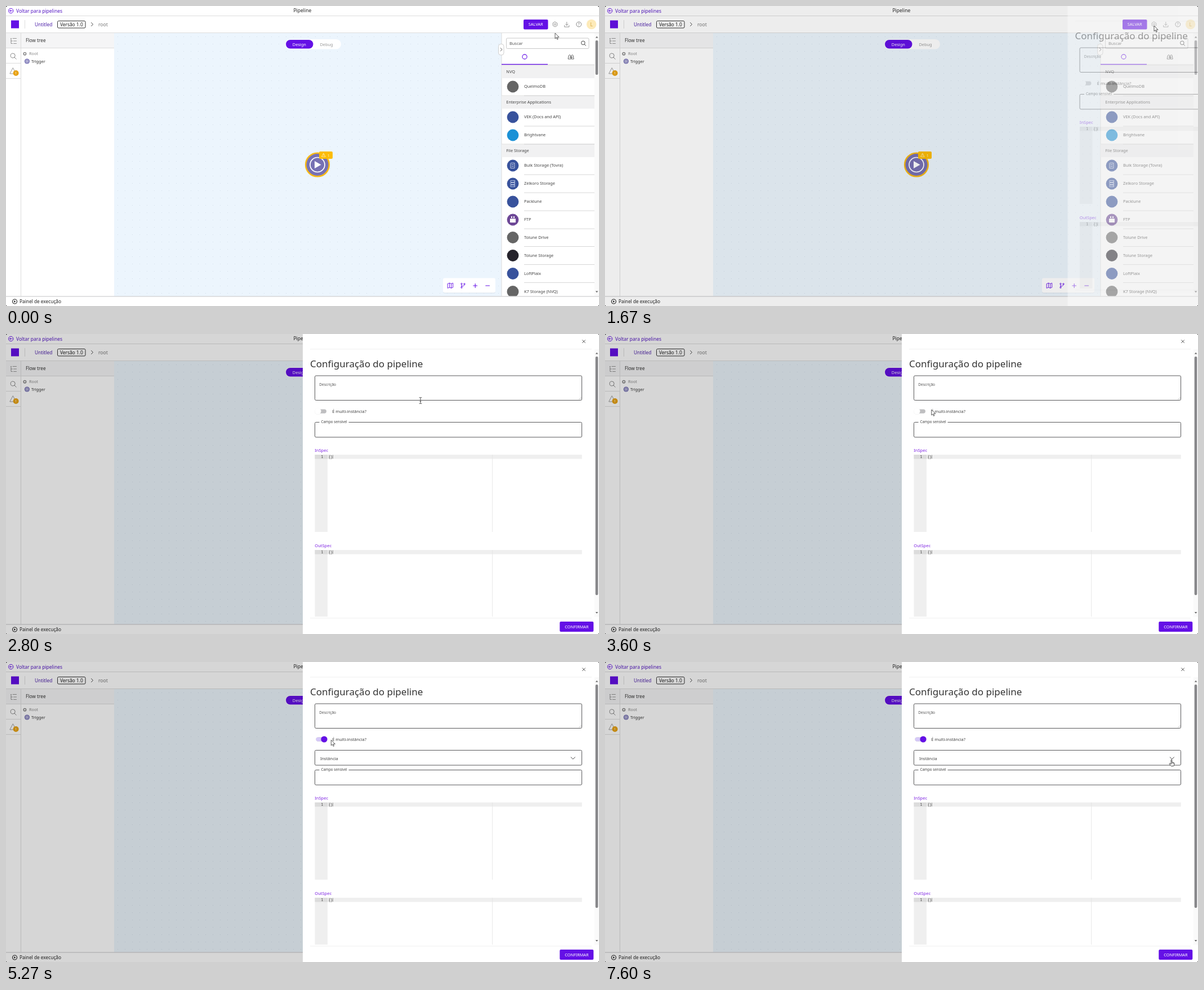
Animation, 1053 px wide and 532 px high, one loop 8000 ms. Source, as an HTML page:

```html
<!DOCTYPE html>
<html lang="pt">
<head>
<meta charset="utf-8">
<title>Pipeline</title>
<style>
html, body { margin: 0; width: 100%; height: 100%; overflow: hidden; background: #000; }
svg { display: block; width: 1053px; height: 532px; font-family: "Noto Sans", sans-serif; }
.mono { font-family: "Noto Sans Mono", monospace; }
</style>
</head>
<body>
<svg id="stage" viewBox="0 0 1053 532" xmlns="http://www.w3.org/2000/svg"></svg>
<script>
const PURPLE = '#6410e6', INK = '#333', LINE = '#dcdcdc', AMBER = '#f7b916';

const rect = (x, y, w, h, fill, more = '') =>
  `<rect x="${x}" y="${y}" width="${w}" height="${h}" fill="${fill}" ${more}/>`;
const disc = (x, y, r, fill, more = '') =>
  `<circle cx="${x}" cy="${y}" r="${r}" fill="${fill}" ${more}/>`;
const ring = (x, y, r, color, w = 1) => disc(x, y, r, 'none', `stroke="${color}" stroke-width="${w}"`);
const path = (d, color, w = 1, fill = 'none') =>
  `<path d="${d}" fill="${fill}" stroke="${color}" stroke-width="${w}" stroke-linecap="round" stroke-linejoin="round"/>`;
const shape = (d, fill) => `<path d="${d}" fill="${fill}"/>`;
const text = (x, y, s, size, fill = INK, more = '') =>
  `<text x="${x}" y="${y}" font-size="${size}" fill="${fill}" ${more}>${s}</text>`;
const mid = 'text-anchor="middle"';

function topBars() {
  return rect(0, 0, 1053, 532, '#fff') +
    rect(0, 17, 1053, 1, LINE) + rect(0, 47, 1053, 1, LINE) +
    ring(8.7, 8.5, 4.2, PURPLE) + path('M11 8.5H6.6M8.3 6.7L6.5 8.5l1.8 1.8', PURPLE, .9) +
    text(18, 11.5, 'Voltar para pipelines', 8.5, '#5416c4') +
    text(526.3, 11.4, 'Pipeline', 8.5, '#222', mid + ' font-weight="500"') +
    rect(9, 25.5, 14, 14, PURPLE) +
    rect(33, 25, 1, 15, LINE) +
    text(51, 35.5, 'Untitled', 8.3, '#4a1ca8') +
    rect(91.5, 26.5, 49.5, 12.5, '#fff', 'rx="2" stroke="#333"') +
    text(116.3, 35.8, 'Versão 1.0', 8.4, '#222', mid) +
    path('M151.5 29.5l3 3-3 3', '#444') +
    text(164, 35.5, 'root', 8.5, '#777') +
    rect(919, 24, 43.5, 17.5, PURPLE, 'rx="2"') +
    text(940.7, 35.4, 'SALVAR', 7.4, '#fff', mid + ' font-weight="500"') +
    `<g id="hover">${disc(975, 32.5, 8.8, '#e3e3e6')}${ring(975, 32.5, 8.8, '#cfcfd4', .8)}</g>` +
    path('M975 28.2l3.8 2.2v4.3l-3.8 2.2-3.8-2.2v-4.3z', '#888', .9) + ring(975, 32.5, 1.5, '#888', .9) +
    path('M995.8 28.5v5.5M993.5 32l2.3 2.3 2.3-2.3M991.7 34.5v2.6h8.2v-2.6', '#888', .9) +
    ring(1017.2, 32.5, 4.4, '#777', .9) + text(1017.2, 34.9, '?', 6.5, '#666', mid) +
    disc(1039.6, 32.5, 8.7, '#fdeab8') + text(1039.6, 35.6, 'L', 8.4, '#d3a43b', mid);
}

function leftSide() {
  return rect(0, 48, 26, 26, '#f3f3f4') +
    rect(26, 48, 1, 467, LINE) + [74, 101, 128].map(y => rect(0, y, 26, 1, LINE)).join('') +
    path('M8.5 57.5h1M12 57.5h6.5M9 58v8.5h2.5M9 62h2.5M13.5 62h5M13.5 66.5h5', '#888', .9) +
    ring(12.2, 88, 4, '#888') + path('M15.2 91.2l3 3', '#888') +
    path('M12.5 110l5.3 10H7.2z', '#999') +
    disc(17.6, 119, 5, '#e8a317') + text(17.6, 121.1, '1', 5.5, '#fff', mid) +
    rect(27, 48, 165, 26, '#f5f5f6') + rect(27, 74, 165, 1, LINE) +
    text(35, 64, 'Flow tree', 8.3) +
    ring(33.4, 84.7, 2.2, '#888', 1.6) + text(41, 87.3, 'Root', 7.3, '#888') +
    disc(37.4, 98, 4.6, '#7772b4') + ring(37.4, 98, 2.7, '#fff', .6) + shape('M36.6 96.5l2.4 1.5-2.4 1.5z', '#fff') +
    text(45, 100.5, 'Trigger', 7.3);
}

function canvasArea() {
  return rect(192, 48, 688, 467, '#ecf5fd') + rect(192, 48, 688, 467, 'url(#dots)') +
    rect(496, 59, 99, 17.5, '#fff', 'rx="8.7"') + rect(497, 60, 48.5, 15.5, PURPLE, 'rx="7.7"') +
    text(520.8, 70.6, 'Design', 7.4, '#fff', mid + ' font-weight="500"') +
    text(569, 70.6, 'Debug', 7.4, '#999', mid) +
    disc(553, 281.5, 20.8, '#7771b4', `stroke="${AMBER}" stroke-width="2.6"`) +
    ring(553, 281.5, 13, '#fff', 1.7) + shape('M548 275v13l11.5-6.5z', '#fff') +
    rect(556, 258, 24, 13, '#fcbc05', 'rx="2"') +
    path('M564 261.5l3.2 5.8h-6.4zM564 263.5v1.8', '#fff3cf', .7) + text(572.8, 267.5, '1', 7, '#fff3cf', mid) +
    rect(776, 483.5, 93, 26, '#d8e2ec', 'rx="3"') + rect(776, 482.5, 93, 26, '#fff', 'rx="3"') +
    path('M784.5 492.5l3-1.2 3.2 1.2 3-1.2v7.7l-3 1.2-3.2-1.2-3 1.2zM787.5 491.5v7.3M790.7 492.5v7.5', PURPLE, .9) +
    ring(809, 492.7, 1.2, PURPLE, .9) + ring(814, 493, 1.2, PURPLE, .9) + ring(809, 499.2, 1.2, PURPLE, .9) +
    path('M809 494v4M814 494.3q0 2.5-5 2.7', PURPLE, .9) +
    path('M829.8 496h6.8M833.2 492.6v6.8M851.8 496h6.8', PURPLE, 1.1);
}

function scrollBar(top, bottom, thumb, id) {
  return rect(1045, top - 7, 8, bottom - top + 14, '#fafafa') +
    shape(`M1046.8 ${top + 1.5}h4.6l-2.3-2.8z`, '#666') + shape(`M1046.8 ${bottom - 1.5}h4.6l-2.3 2.8z`, '#666') +
    rect(1046.7, top + 6, 4.6, thumb, '#87878a', `rx="2" ${id}`);
}

function library() {
  const heads = [[116, 'NVQ'], [170, 'Enterprise Applications'], [256, 'File Storage']];
  const rows = [
    [143, 'QuelmoDB', '#656565'], [197, 'VEK (Docs and API)', '#38529c'], [229, 'Brightvane', '#1b91d6'],
    [283, 'Bulk Storage (Tovra)', '#38529c'], [315, 'Zelkoro Storage', '#38529c'], [347, 'Packlune', '#38529c'],
    [379, 'FTP', '#6d4796'], [410.5, 'Tolune Drive', '#656565'], [442.5, 'Tolune Storage', '#25232b'],
    [474.5, 'LoftPlaix', '#38529c'], [506.5, 'K7 Storage (NVQ)', '#656565']
  ];
  return rect(880, 48, 173, 467, '#fff') + rect(879.5, 48, 1, 467, LINE) +
    rect(888.5, 57, 146.5, 18.5, '#fff', 'rx="2" stroke="#c8c8c8"') + text(894, 69.1, 'Buscar', 7.4, '#555') +
    ring(1024.8, 65.4, 3.3, '#444') + path('M1027.3 68l2.3 2.3', '#444') +
    ring(921, 90, 4.1, PURPLE, 1.1) +
    path('M999.5 87.5q1.5-2 2.8 0l1 6.5h-4.8zM1004.2 87.5q1.5-2 2.8 0l1.2 6.5h-3.6zM1001 91h5', '#555', .9) +
    rect(880, 103.5, 165, 1, LINE) + rect(880, 102.8, 82, 1.5, PURPLE) +
    heads.map(([y, s]) => rect(880, y - 11, 165, 23, '#f1f1f2') + rect(880, y - 11.5, 165, .8, LINE) +
      text(888.3, y + 2.8, s, 7.35, '#444')).join('') +
    rows.map(([y, s, c]) => disc(900, y, 10.4, c) + text(920, y + 2.4, s, 7.4, '#444') +
      rect(920, y + 15.6, 125, .9, '#d3d3d3')).join('') +
    path('M897 278.5h6v9h-7v-8zM898 281.5h3M898 284.5h3', '#e6ebf8', .8) +
    path('M896.5 309.5h7v3h-7zM896.5 313.5h7v3h-7zM896.5 317.5h7v3h-7zM902 311h.2M902 315h.2M902 319h.2', '#c9d3ee', .8) +
    rect(895, 377, 10, 7, '#fff', 'rx=".8"') + shape('M897 376v-3h2v3zM901 376v-3h2v3z', '#fff') +
    scrollBar(55, 507, 61, '') +
    rect(874.5, 67.5, 9.5, 19.5, '#fff', 'rx="4" stroke="#cfcfcf"') + path('M878.2 74.4l2.6 2.8-2.6 2.8', '#555', .9);
}

function bottomBar() {
  return rect(0, 514.5, 1053, 17.5, '#fff') + rect(0, 514.5, 1053, 1, '#c4c4c6') +
    ring(15.5, 524, 4, '#222', 1.1) + shape('M14.3 522v4l3-2z', '#222') +
    text(24, 527, 'Painel de execução', 8.3, '#222');
}

function editor(y, name) {
  return text(548.3, y - 4.8, name, 7.5, '#7d22e2') +
    rect(548.5, y, 22.5, 137, '#efefef') + rect(548.5, y, 22.5, 7.5, '#dcdcdc') +
    rect(571, y, 451.7, 7.5, '#efefef') + rect(863.3, y, .9, 137, '#e6e6e6') +
    text(561.5, y + 6, '1', 6.3, INK, mid + ' class="mono"') +
    text(572.8, y + 6, '{}', 6.3, INK, 'class="mono"') +
    rect(573, y + .8, 3.4, 6, 'none', 'stroke="#c4c4c4" stroke-width=".6"') +
    rect(580, y + .5, .7, 6.6, '#777');
}

const field = (y, h) => rect(548.5, y, 474, h, '#fff', 'rx="2" stroke="#58585a"');

function drawer() {
  return rect(527, 0, 526, 532, '#fff') + rect(540, 26.5, 500, .8, '#ececec') +
    path('M1023.5 10.7l5 5M1028.5 10.7l-5 5', '#444', .9) +
    text(540, 59, 'Configuração do pipeline', 17, INK) +
    field(74, 43.5) + text(556.3, 92.2, 'Descrição', 6.5, '#555') +
    path('M1017.5 116l4-4M1020 116l1.6-1.6', '#999', .6) +
    rect(550.5, 133.4, 18.5, 7.4, '#bfbfc1', 'rx="3.7"') +
    `<g id="track">${rect(550.5, 133.4, 18.5, 7.4, '#d6c9f8', 'rx="3.7"')}</g>` +
    disc(0, 137.4, 5.9, '#000', 'id="shade" opacity=".06"') + disc(0, 137, 5.6, '#fff', 'id="knob"') +
    text(579.3, 139.8, 'É multi-instância?', 7.4, '#444') +
    `<g id="select">${field(156.5, 26.5)}${text(558, 173.5, 'Instância', 7.45, '#444')}${path('M1003.2 168.8l3.6 3.4 3.6-3.4', '#444')}</g>` +
    `<g clip-path="url(#form)"><g id="lower">${field(156.5, 26.5)}${rect(556.5, 155, 52, 3, '#fff')}` +
    text(559.5, 158.3, 'Campo sensível', 6.3, '#444') +
    editor(214, 'InSpec') + editor(383, 'OutSpec') + '</g></g>' +
    rect(540, 503.5, 500, .8, '#ececec') +
    rect(983.3, 510, 60, 18, PURPLE, 'rx="2"') +
    text(1013.4, 521.6, 'CONFIRMAR', 7.3, '#fff', mid + ' font-weight="500"') +
    scrollBar(34, 494.5, 423, 'id="thumb"');
}

const pointers =
  `<g id="arrow">${path('M0 0v9.3l2.2-2 1.6 3.5 1.5-.7-1.6-3.4h3z', '#333', .8, '#fff')}</g>` +
  `<g id="hand">${path('M-1 1q0-1 .9-1t.9 1v3.8l3 .7q1.3.4 1.2 1.7l-.5 2.8q-.3 1.5-1.3 1.5H-.3q-.9 0-1.4-.8l-2.2-3.4q.4-1 1.3-.6L-1 8z', '#333', .9, '#fff')}` +
  `${path('M.9 5v2M2.4 5.4v1.7M3.9 5.8v1.4', '#444', .6)}</g>` +
  `<g id="beam">${path('M-2-5.3h1.4L0-4.8l.6-.5H2M0-4.8v9.6M-2 5.3h1.4L0 4.8l.6.5H2M-1 1.5h2', '#444', .9)}</g>`;

document.getElementById('stage').innerHTML =
  `<defs><clipPath id="win">${rect(0, 0, 1053, 532, '#000', 'rx="3"')}</clipPath>
  <clipPath id="form">${rect(527, 28, 526, 473.3, '#000')}</clipPath>
  <pattern id="dots" x="192" y="48" width="13" height="13" patternUnits="userSpaceOnUse">${disc(6.5, 6.5, .55, '#cfdbe6')}</pattern></defs>
  <g clip-path="url(#win)">${topBars()}${leftSide()}${canvasArea()}${library()}${bottomBar()}
  ${rect(0, 0, 1053, 532, '#000', 'id="veil"')}<g id="drawer">${drawer()}</g></g>
  ${pointers}${disc(0, 0, 0, 'none', 'id="pulse" stroke="#666" stroke-width="1.5"')}`;

const el = {};
document.querySelectorAll('[id]').forEach(n => el[n.id] = n);
const set = (id, attrs) => { for (const k in attrs) el[id].setAttribute(k, attrs[k]); };
const show = (id, on) => set(id, { display: on ? 'inline' : 'none' });
const clamp = v => Math.max(0, Math.min(1, v));

// Each move: [ms, x, y] points joined by a smooth curve
const moves = [
  [[0, 975, 48.5], [200, 975, 35.5]],
  [[2133, 975, 35.5], [2800, 736, 118], [3000, 685, 122], [3867, 561, 137]],
  [[5200, 561, 137], [5600, 661, 146.5], [6067, 809, 142.5], [6333, 883, 145.5], [6933, 977, 161], [7600, 1006, 173]]
];

function cursorAt(t) {
  const pts = moves.filter(m => m[0][0] <= t).pop(), last = pts.length - 1;
  if (t >= pts[last][0]) return pts[last].slice(1);
  const i = pts.findIndex(p => p[0] > t) - 1, a = pts[i], b = pts[i + 1];
  const h = b[0] - a[0], u = (t - a[0]) / h;
  const slope = (k, c) => {
    if (k === last && last > 1) return 0;
    const p = pts[Math.max(0, k - 1)], n = pts[Math.min(last, k + 1)];
    return (n[c] - p[c]) / (n[0] - p[0]);
  };
  return [1, 2].map(c => {
    const s = u * u * (3 - 2 * u);
    return a[c] + (b[c] - a[c]) * s + h * u * (1 - u) * ((1 - u) * slope(i, c) - u * slope(i + 1, c));
  });
}

function cursorKind(t, x, y) {
  if (t < 2130) return t > 190 && t < 1660 ? 'hand' : 'arrow';
  if (x < 572 || (x > 1000 && y > 165)) return 'hand';
  return t < 3860 && y > 74 && y < 118.6 ? 'beam' : 'arrow';
}

function pulseAt(t) {
  if (t > 730 && t < 1060) return [975, 33.5, 44 * (1 - (t - 733) / 333)];
  if (t > 4460 && t < 4730) return [561, 136, 53.5 * (1 - (t - 4467) / 267)];
  return [0, 0, 0];
}

function render(ms) {
  const t = Math.floor((ms + 4) * .015) / .015;

  const [x, y] = cursorAt(t), kind = cursorKind(t, x, y);
  for (const id of ['arrow', 'hand', 'beam']) show(id, id === kind);
  set(kind, { transform: `translate(${x} ${y})` });

  const [cx, cy, r] = pulseAt(t);
  show('pulse', r > .5);
  set('pulse', { cx, cy, r: Math.max(0, r) });
  show('hover', t > 1460 && t < 1660);

  const open = 1 - Math.pow(1 - clamp((t - 1600) / 200), 1.43);
  const visible = t > 1660;
  show('drawer', visible);
  show('veil', visible);
  set('veil', { opacity: .16 * open });
  set('drawer', { transform: `translate(${526 * (1 - open)} 0)`, opacity: open });

  const on = t > 4990, k = clamp((t - 4933) / 200), knobX = 554 + 11 * k;
  set('track', { opacity: k });
  set('shade', { cx: knobX });
  set('knob', { cx: knobX, fill: on ? PURPLE : '#fff' });
  show('select', on);
  set('lower', { transform: `translate(0 ${on ? 35 : 0})` });
  set('thumb', { height: on ? 396 : 423 });
}

const start = performance.now();
function tick() {
  render((performance.now() - start) % 8000);
  requestAnimationFrame(tick);
}
tick();
</script>
</body>
</html>
```
